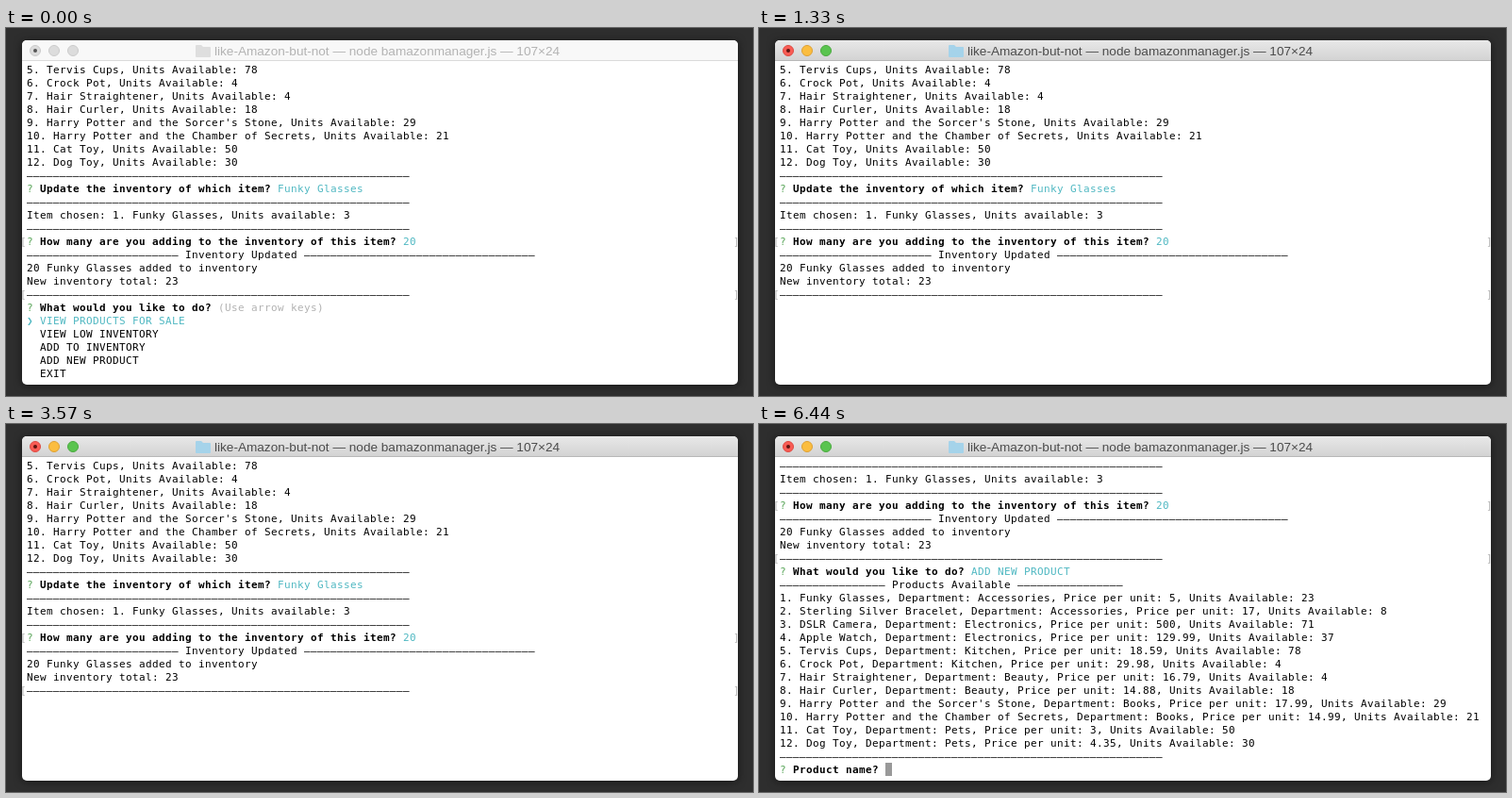
Animation, 792 px wide and 390 px high, one loop 6.72 s. Source, as an HTML page:

```html
<!DOCTYPE html>
<html lang="en">
<head>
<meta charset="utf-8">
<title>Inventory manager</title>
<style>
html, body { margin: 0; width: 100%; height: 100%; overflow: hidden; background: #2e2e2e; }
#win { position: absolute; left: 17px; top: 13px; width: 759px; height: 365px; overflow: hidden;
  border-radius: 5px; background: #fff; box-shadow: 0 1px 8px #0008; }
#bar { display: block; position: absolute; left: 0; top: 0;
  font: 13.6px "Liberation Sans", Arial, sans-serif; }
pre { position: absolute; left: 5px; top: 25px; margin: 0; color: #000;
  font: 11px/14px "DejaVu Sans Mono", monospace; font-variant-ligatures: none; }
pre i { font-style: normal; }
.cyan { color: #50b8c2; }
.green { color: #5aa65a; }
.hint { color: #b2b2b2; }
.edge, .pointer { position: absolute; color: #b2b2b2; }
.pointer { color: #50b8c2; }
.cursor { position: absolute; width: 7px; height: 14px; margin-top: -1px; background: #999; }

.bar { fill: url(#lit); }
.rule { fill: #b8b8b8; }
.name { fill: #4c4c4c; }
.folder { fill: #a5d3ea; }
.red { fill: #f95c54; stroke: #dc4a43; }
.yellow { fill: #fbbd3f; stroke: #dda034; }
.lime { fill: #5ac44f; stroke: #4aa93f; }
.dot { fill: #5c1410; }
.idle .bar { fill: #f8f8f8; }
.idle .rule { fill: #dadada; }
.idle .name { fill: #b3b3b3; }
.idle .folder { fill: #dedede; }
.idle circle { fill: #dcdcdc; stroke: #cbcbcb; }
.idle .dot { fill: #555; stroke: none; }
</style>
</head>
<body>
<div id="win">
  <svg id="bar" width="759" height="22">
    <linearGradient id="lit" x2="0" y2="1">
      <stop stop-color="#e8e8e8"/><stop offset="1" stop-color="#d2d2d2"/>
    </linearGradient>
    <rect class="bar" width="759" height="22"/>
    <rect class="rule" y="21" width="759" height="1"/>
    <circle class="red" cx="14" cy="11" r="5.5"/>
    <circle class="dot" cx="14" cy="11" r="2"/>
    <circle class="yellow" cx="34" cy="11" r="5.5"/>
    <circle class="lime" cx="54" cy="11" r="5.5"/>
    <path class="folder" d="M184 6q0-1 1-1h5l2 2h7q1 0 1 1v9q0 1-1 1h-14q-1 0-1-1z"/>
    <text class="name" x="204" y="16">like-Amazon-but-not — node bamazonmanager.js — 107×24</text>
  </svg>
  <pre id="term"></pre>
</div>
<script>
const LOOP = 6720;
const win = document.getElementById('win');
const term = document.getElementById('term');

const stock = [
  ['Funky Glasses', 'Accessories', 5, 23],
  ['Sterling Silver Bracelet', 'Accessories', 17, 8],
  ['DSLR Camera', 'Electronics', 500, 71],
  ['Apple Watch', 'Electronics', 129.99, 37],
  ['Tervis Cups', 'Kitchen', 18.59, 78],
  ['Crock Pot', 'Kitchen', 29.98, 4],
  ['Hair Straightener', 'Beauty', 16.79, 4],
  ['Hair Curler', 'Beauty', 14.88, 18],
  ["Harry Potter and the Sorcer's Stone", 'Books', 17.99, 29],
  ['Harry Potter and the Chamber of Secrets', 'Books', 14.99, 21],
  ['Cat Toy', 'Pets', 3, 50],
  ['Dog Toy', 'Pets', 4.35, 30]
];
const choices = ['VIEW PRODUCTS FOR SALE', 'VIEW LOW INVENTORY', 'ADD TO INVENTORY', 'ADD NEW PRODUCT', 'EXIT'];

const tag = (name, text) => `<i class="${name}">${text}</i>`;
const dash = n => '–'.repeat(n);
const ask = (question, answer = '') => `${tag('green', '?')} <b>${question}</b> ${answer}`;
const edges = line =>
  '<i class="edge" style="margin-left:-7px">[</i><i class="edge" style="left:749px">]</i>' + line;

const rule = dash(58);
const short = stock.map(([name, , , units], i) => `${i + 1}. ${name}, Units Available: ${units}`);
const full = stock.map(([name, dept, price, units], i) =>
  `${i + 1}. ${name}, Department: ${dept}, Price per unit: ${price}, Units Available: ${units}`);

const history = [
  ...short.slice(4),
  rule,
  ask('Update the inventory of which item?', tag('cyan', 'Funky Glasses')),
  rule,
  'Item chosen: 1. Funky Glasses, Units available: 3',
  rule,
  edges(ask('How many are you adding to the inventory of this item?', tag('cyan', 20))),
  `${dash(23)} Inventory Updated ${dash(35)}`,
  '20 Funky Glasses added to inventory',
  'New inventory total: 23',
  edges(rule)
];
const todo = 'What would you like to do?';

const menu = (picked, hint = '') => [
  ...history,
  ask(todo, tag('hint', hint)),
  ...choices.map((text, i) => i === picked
    ? tag('pointer', '❯') + '  ' + tag('cyan', text)
    : '  ' + text)
];

const products = [
  ...history.slice(10),
  ask(todo, tag('cyan', choices[3])),
  `${dash(16)} Products Available ${dash(16)}`,
  ...full,
  rule,
  ask('Product name?', '<i class="cursor"></i>')
];

// Start time in ms and screen content
const scenes = [
  [0, menu(0, '(Use arrow keys)')],
  [1330, history],
  [1400, menu(1)],
  [1820, menu(2)],
  [2100, menu(3)],
  [3570, history],
  [3640, products]
].map(([start, lines]) => [start, lines.join('\n')]);

// Fit the font's own advance to the terminal's 7px grid
term.innerHTML = '<span>' + 'm'.repeat(100) + '</span>';
const advance = term.firstChild.getBoundingClientRect().width / 100;
term.style.letterSpacing = 7 - advance + 'px';

let shown;
function draw() {
  const t = performance.now() % LOOP;
  win.classList.toggle('idle', t < 350);
  const scene = scenes.findLast(([start]) => t >= start);
  if (scene !== shown) term.innerHTML = (shown = scene)[1];
  requestAnimationFrame(draw);
}
draw();
</script>
</body>
</html>
```
